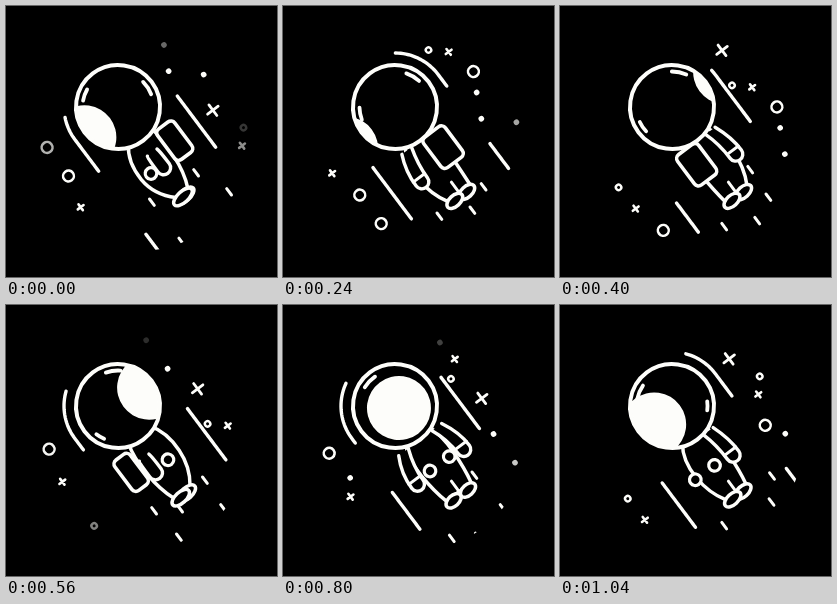
An HTML page with a canvas that plays this animation: 271x271 px, repeating every 1.12 s.

```html
<!DOCTYPE html>
<html lang="en">
<head>
<meta charset="utf-8">
<title>Spinning astronaut</title>
<style>
html, body { margin: 0; width: 100%; height: 100%; overflow: hidden; background: #000; }
canvas { display: block; width: 100vw; height: 100vh; }
</style>
</head>
<body>
<canvas id="stage" width="271" height="271"></canvas>
<script>
const ctx = document.getElementById('stage').getContext('2d');
const STEP = 80, COUNT = 14, WHITE = '#fdfdfa', TAU = Math.PI * 2, RAD = Math.PI / 180;
const SPAN = 263;                    // drift of the star field in one loop
const FALL = 1.7;                    // px along the body axis per unit of drift
const HEAD = { x: 112, y: 101, r: 42 };
const mod = (a, n) => ((a % n) + n) % n;
const clamp = (v, lo, hi) => Math.max(lo, Math.min(hi, v));

// Key points: step, drift, turn in degrees (0 faces the viewer).
const keys = [
  [0, 0, -75], [3, 35, -120], [5, 61, -242], [7, 90, -302],
  [8, 119, -322], [10, 159, -357], [13, 226, -400], [14, SPAN, -435]
];

function stateAt(step) {
  const i = keys.findIndex(key => key[0] > step) - 1, a = keys[i], b = keys[i + 1];
  const t = (step - a[0]) / (b[0] - a[0]);
  return [1, 2].map(j => a[j] + (b[j] - a[j]) * t);
}

// All drawing is in the tilted frame: u across the body, v down from the head centre.
function draw(width, path, fill) {
  ctx.beginPath();
  path();
  if (fill) { ctx.fillStyle = fill; ctx.fill(); }
  if (width) { ctx.lineWidth = width; ctx.stroke(); }
}
const line = (x1, y1, x2, y2) => { ctx.moveTo(x1, y1); ctx.lineTo(x2, y2); };
const circle = (x, y, r) => ctx.arc(x, y, r, 0, TAU);
const plus = (x, y, r) => { line(x - r, y, x + r, y); line(x, y - r, x, y + r); };

const shapes = {
  dot: (u, v) => draw(0, () => circle(u, v, 2.8), WHITE),
  ring: (u, v) => draw(2.6, () => circle(u, v, 5.4)),
  smallRing: (u, v) => draw(2.4, () => circle(u, v, 2.7)),
  cross: (u, v) => draw(2.8, () => plus(u, v, 6.6)),
  smallCross: (u, v) => draw(2.6, () => plus(u, v, 3.6))
};

// Shape, lane, then the drifts at which one passes the head.
const stars = [
  ['dot', 62, -1, 90, 111], ['dot', 74, 13, 173], ['dot', 88, -15], ['dot', -79, 141],
  ['ring', -81, 6, -15, 94, 160], ['ring', 84, 24], ['ring', 63, 184],
  ['smallRing', 61, 50, 152], ['smallRing', 88, 209], ['smallRing', -91, 42, 198],
  ['cross', 74, -35, 70, 132],
  ['smallCross', 76, 42, 160, 201], ['smallCross', -90, -34, 26, 74, 132, 182]
];

function drawStars(drift) {
  for (const [kind, u, ...passes] of stars) for (const pass of passes) {
    const v = (mod(drift - pass + 80, SPAN) - 80) * FALL;
    const x = HEAD.x + 0.8 * u + 0.6 * v, y = HEAD.y - 0.6 * u + 0.8 * v;
    ctx.globalAlpha = clamp((102 - Math.hypot(x - 138, y - 136)) / 7, 0, 1);
    shapes[kind](u, v);
  }
  ctx.globalAlpha = 1;
}

// Streaks bend round the head, run straight on and shorten as they leave.
function drawStreaks(drift) {
  const R = 54, births = { '-1': [81, 155, 239], '1': [26, 118, 209] };
  for (const side of [-1, 1]) for (const birth of births[side]) {
    const start = mod(drift - birth, SPAN) * FALL - 65;
    if (start > 120) continue;
    const length = clamp(64 - (start - 45) * 0.8, 20, 64);
    draw(3.4, () => {
      for (let i = 0; i <= 24; i++) {
        const s = start + length * i / 24, a = Math.min(0, s) / R;
        ctx.lineTo(side * R * Math.cos(a), s < 0 ? R * Math.sin(a) : s);
      }
    });
  }
}

// Dashes slip out from behind the body: lane, drift at birth.
const dashes = [[25, 55], [22, 141], [23, 252], [0, 228], [-30, 258], [-12, 39],
  [38, 182], [-30, 160], [-34, 67]];

function drawDashes(drift) {
  for (const [u, birth] of dashes) {
    const v = 90 + mod(drift - birth, SPAN) / 2;
    if (v < 154) draw(3, () => line(u, v, u, v + 8));
  }
}

function drawArm(u) {
  const side = Math.abs(u) > 15, top = side ? 42 : 57, shoulder = side ? u * 0.72 : u;
  draw(3.4, () => {
    ctx.moveTo(shoulder - 6, top);
    ctx.quadraticCurveTo(u - 7, 58, u - 7, 76);
    ctx.arc(u, 76, 7, Math.PI, 0, true);
    ctx.quadraticCurveTo(u + 7, 60, shoulder + 6, top);
  }, '#000');
  if (side) draw(3, () => line(u - 7, 71, u + 7, 71));
}

function drawBody(turn) {
  const lean = 4 * Math.sin(turn * RAD), left = lean - 21, right = lean + 19;
  const swing = Math.cos(turn * 1.2 * RAD), foot = 1 + 8 * Math.abs(swing);
  draw(3.5, () => {
    ctx.moveTo(-14, 36);
    ctx.quadraticCurveTo(left - 1, 50, left, 72);
    ctx.quadraticCurveTo(left + 1, 92, -foot - 7, 107);
    ctx.lineTo(foot + 6, 107);
    ctx.quadraticCurveTo(right - 1, 92, right, 72);
    ctx.quadraticCurveTo(right + 1, 50, 14, 36);
  }, '#000');
  if (foot > 4) draw(3, () => line(0, 94, 0, 106));
  for (const side of [1, -1])
    draw(3.5, () => ctx.ellipse(side * foot - 1, 111, 12 - foot / 3, 5.4, -0.1, 0, TAU), '#000');

  const back = mod(turn, 360) - 180;
  if (Math.abs(back) < 125) {
    const half = 17 - Math.abs(back) * 0.06;
    draw(3.6, () => ctx.roundRect(back * 0.24 - half, 42, half * 2, 38, 5), '#000');
  }
  for (const side of [1, -1])
    if (side * turn < 20 || side * turn > 150) drawArm(side * 29 * swing);
  for (const side of [1, -1]) {
    const u = turn * 0.34 + side * 12;
    if (Math.abs(u) < 28) draw(3.2, () => circle(u, 73, 5.8), '#000');
  }
}

function drawGlint(angle, half) {
  const mid = angle * RAD + Math.atan2(0.6, 0.8), h = half * RAD;
  if (half > 1) draw(3.8, () => ctx.arc(0, 0, 35.5, mid - h, mid + h));
}

function drawHead(turn, drift) {
  const loop = drift / SPAN;
  draw(0, () => circle(0, 0, HEAD.r), '#000');
  drawGlint(200 - 233 * loop, 10 * Math.abs(Math.cos(Math.PI * (loop - 0.1))));
  drawGlint(-33 - 127 * Math.sin(loop * Math.PI / 2), 12);
  ctx.save();
  ctx.beginPath();
  circle(0, 0, HEAD.r);
  ctx.clip();
  draw(0, () => circle(74 * Math.sin(turn / 2 * RAD), 4, 32), WHITE);
  ctx.restore();
  draw(4, () => circle(0, 0, HEAD.r));
}

function render(now) {
  const [drift, spin] = stateAt(Math.floor(now / STEP) % COUNT);
  const turn = mod(spin + 180, 360) - 180;
  ctx.setTransform(1, 0, 0, 1, 0, 0);
  ctx.fillStyle = '#000';
  ctx.fillRect(0, 0, 271, 271);
  ctx.strokeStyle = WHITE;
  ctx.lineCap = ctx.lineJoin = 'round';
  ctx.save();
  ctx.beginPath();
  circle(134, 136, 109);
  ctx.clip();
  ctx.transform(0.8, -0.6, 0.6, 0.8, HEAD.x, HEAD.y);
  drawStars(drift);
  drawStreaks(drift);
  drawDashes(drift);
  drawBody(turn);
  drawHead(turn, drift);
  ctx.restore();
}

const begin = performance.now();
function tick() {
  render(performance.now() - begin);
  requestAnimationFrame(tick);
}
tick();
</script>
</body>
</html>
```
